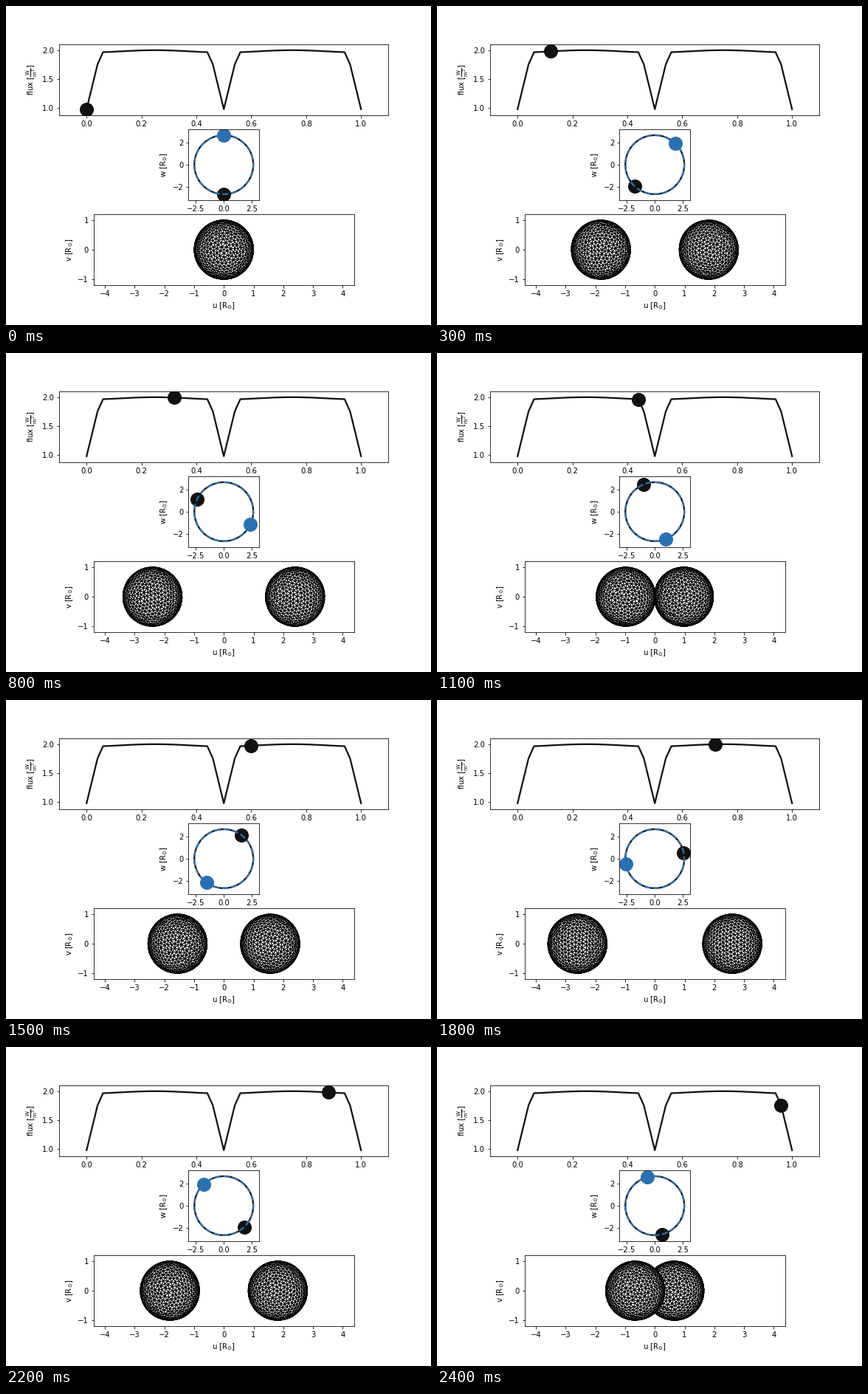
A matplotlib script that plays this animation: 576x432 px, repeating every 2.5 s.

```python
import numpy as np
import matplotlib.pyplot as plt
from matplotlib.animation import FuncAnimation
from matplotlib.collections import PolyCollection
from matplotlib.tri import Triangulation

BLACK, BLUE = "#111111", "#2b71b1"
FRAMES = 25
ORBIT = 2.65      # distance of each star from the barycentre
RADIUS = 0.997
RINGS = 26        # mesh rings from pole to pole
LINE = 2.25
SOLAR = r"$\mathrm{R_{\odot}}$"

plt.rcParams.update({"font.family": "DejaVu Sans", "font.size": 10})


def flux(phase):
    """Light curve: slow ellipsoidal variation with two equal eclipses."""
    depth = np.abs(phase - np.round(2 * phase) / 2)
    smooth = 1.98 - 0.02 * np.cos(4 * np.pi * phase)
    eclipse = np.interp(depth, [0, 0.02, 0.04], [0.975, 1.365, 1.754])
    return np.where(depth < 0.05, eclipse, smooth)


def orbit(phase, sign):
    angle = 2 * np.pi * phase
    return sign * ORBIT * np.sin(angle), sign * ORBIT * np.cos(angle)


def sphere_mesh():
    """Triangles of a unit sphere, shape (n, 3, 3), first axis along x."""
    rng = np.random.default_rng(4)
    step = np.pi / RINGS
    edge = step / np.sin(np.pi / 3)
    theta, phi = [0.0], [0.0]
    for i in range(1, RINGS):
        t = i * step
        n = int(round(2 * np.pi * np.sin(t) / edge))
        start = rng.uniform(0, 2 * np.pi)
        wobble = 0.12 * edge * (i < RINGS - 1)
        theta.extend(t + rng.uniform(-wobble, wobble, n))
        turn = rng.uniform(-wobble, wobble, n) / np.sin(t)
        phi.extend(start + 2 * np.pi * np.arange(n) / n + turn)
    theta, phi = np.array(theta), np.array(phi)

    # A planar Delaunay mesh of the stereographic view is the sphere's hull.
    r = np.tan(theta / 2)
    faces = Triangulation(r * np.cos(phi), r * np.sin(phi)).triangles
    points = np.column_stack([np.cos(theta),
                              np.sin(theta) * np.cos(phi),
                              np.sin(theta) * np.sin(phi)])
    # Close the remaining cap with a fan around the far pole.
    last = np.arange(len(points) - n, len(points))
    pole = np.full(n, len(points))
    fan = np.column_stack([last, np.roll(last, -1), pole])
    points = np.vstack([points, [-1, 0, 0]])
    return RADIUS * points[np.vstack([faces, fan])]


MESH = sphere_mesh()


def visible_faces(u, w):
    """Front-facing triangles of a star at (u, w), back to front."""
    du, dw = u / ORBIT, w / ORBIT
    x, y, v = MESH[..., 0], MESH[..., 1], MESH[..., 2]
    depth = (x * dw - y * du).mean(axis=1)
    order = np.argsort(depth)
    order = order[depth[order] > 0]
    return np.stack([u + x * du + y * dw, v], axis=-1)[order]


fig, (top, mid, low) = plt.subplots(3, 1, figsize=(8, 6), dpi=72)
fig.subplots_adjust(left=0.125, right=0.9, bottom=0.125, top=0.88,
                    hspace=0.2, wspace=0.2)


def frame_axes(ax, xlim, ylim, xticks, yticks, ylabel):
    ax.set(xlim=xlim, ylim=ylim, xticks=xticks, yticks=yticks, ylabel=ylabel)


frame_axes(top, (-0.1, 1.1), (0.8725, 2.1025), np.arange(6) / 5,
           [1.0, 1.5, 2.0], r"flux [$\mathrm{\frac{W}{m^{2}}}$]")
span = 1.2 * ORBIT
frame_axes(mid, (-span, span), (-span, span), [-2.5, 0, 2.5], [-2, 0, 2],
           f"w [{SOLAR}]")
frame_axes(low, (-4.375, 4.375), (-1.19, 1.19), range(-4, 5), [-1, 0, 1],
           f"v [{SOLAR}]")
low.set_xlabel(f"u [{SOLAR}]")
mid.set_aspect("equal")
low.set_aspect("equal")


def add_dot(ax, color, z):
    return ax.plot([], [], "o", color=color, ms=18, zorder=z)[0]


phases = np.linspace(0, 1, 51)
top.plot(phases, flux(phases), color=BLACK, lw=LINE)
flux_dot = add_dot(top, BLACK, 2.1)

stars = []
for sign, color, style, z in [(-1, BLACK, "-", 2.0), (1, BLUE, "--", 2.2)]:
    mid.plot(*orbit(phases, sign), style, color=color, lw=LINE, zorder=z)
    dot = add_dot(mid, color, z + 0.1)
    mesh = PolyCollection([], facecolors="white", edgecolors="black",
                          linewidths=1)
    low.add_collection(mesh, autolim=False)
    stars.append((sign, dot, mesh))


def update(i):
    phase = i / FRAMES
    flux_dot.set_data([phase], [float(flux(phase))])
    artists = [flux_dot]
    for sign, dot, mesh in stars:
        u, w = orbit(phase, sign)
        dot.set_data([u], [w])
        mesh.set_verts(visible_faces(u, w))
        mesh.set_zorder(1.5 if w > 0 else 1.2)
        artists += [dot, mesh]
    return artists


anim = FuncAnimation(fig, update, frames=FRAMES, interval=100, repeat=True,
                     repeat_delay=0, blit=False)
plt.show()
```
